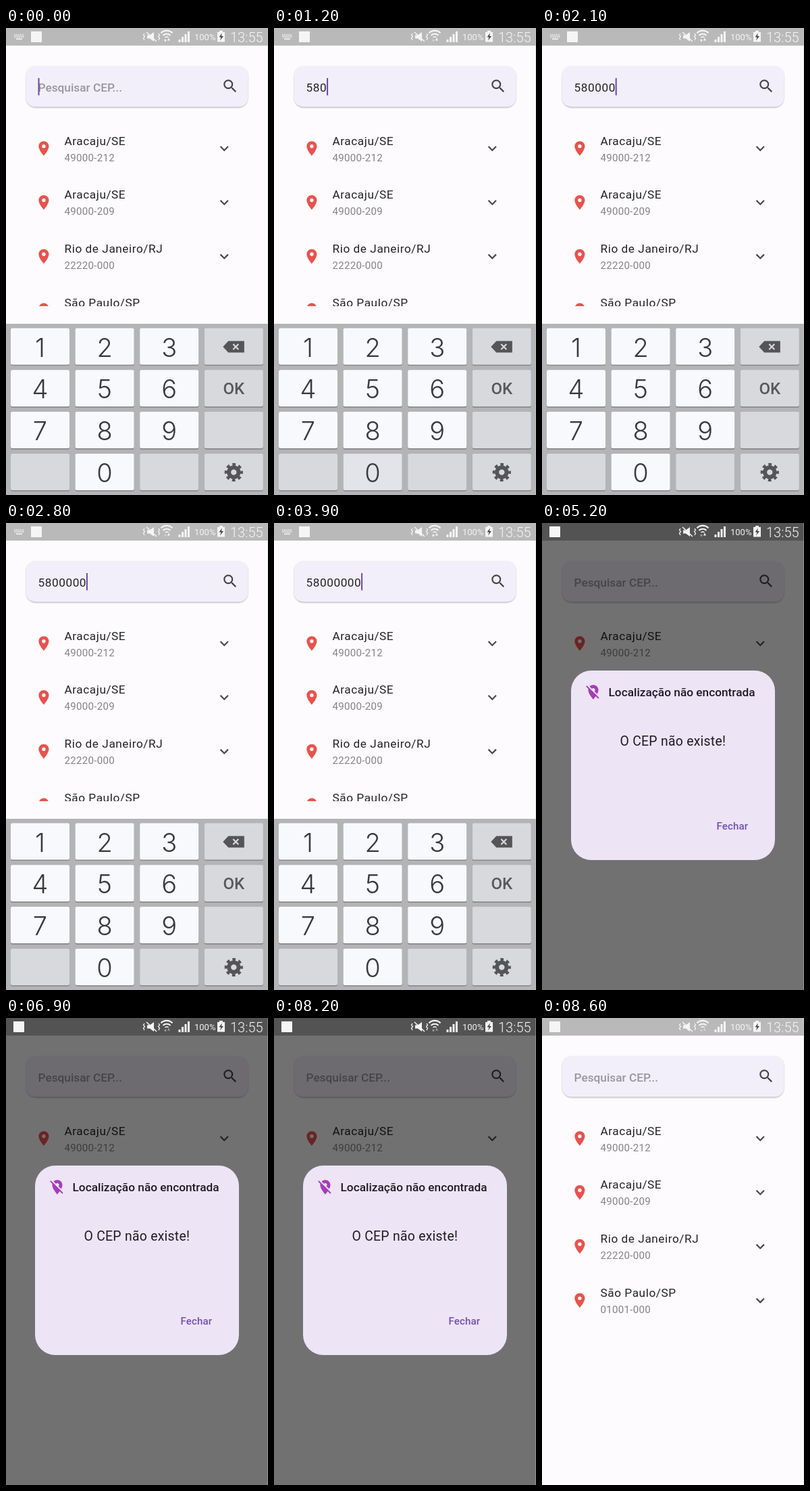
An HTML page that plays this animation: 388 by 690 pixels, repeating every 8.8 s.

```html
<!DOCTYPE html>
<html lang="pt-BR">
<head>
<meta charset="utf-8">
<title>Busca de CEP</title>
<style>
  html, body { margin: 0; width: 100%; height: 100%; overflow: hidden; background: #fdfbfd; }
  svg { display: block; width: 100vw; height: 100vh; font-family: Roboto, "Noto Sans", sans-serif; }
  .title { font-size: 17.24px; letter-spacing: .54px; fill: #242327; }
  .sub { font-size: 15.1px; letter-spacing: .27px; fill: #858388; }
  .strong { font-size: 17.24px; font-weight: 500; }
  .digit { font: 300 38px Inter, "Open Sans", sans-serif; fill: #3b3b3e; text-anchor: middle; }
</style>
</head>
<body>
<svg viewBox="0 0 388 690">
  <defs>
    <path id="pin" fill="#e8524e" fill-rule="evenodd" d="M12 2C8.13 2 5 5.13 5 9c0 5.25 7 13 7 13s7-7.75 7-13c0-3.87-3.13-7-7-7zm0 9.5a2.5 2.5 0 1 1 0-5 2.5 2.5 0 0 1 0 5z"/>
    <path id="more" fill="#49454b" d="M16.59 8.59 12 13.17 7.41 8.59 6 10l6 6 6-6z"/>
    <clipPath id="listClip"><rect id="listBox" y="120" width="388" height="291"/></clipPath>
    <filter id="soft" x="-10%" y="-20%" width="120%" height="150%"><feGaussianBlur stdDeviation="1.2"/></filter>
  </defs>

  <rect width="388" height="690" fill="#fdfbfd"/>
  <rect id="lower" y="438" width="388" height="252" fill="#fef8ff"/>
  <rect width="388" height="26" fill="#bab9ba"/>

  <rect x="30" y="57.5" width="328" height="60" rx="14" fill="#000" opacity=".32" filter="url(#soft)"/>
  <rect x="29.5" y="56" width="329" height="60.5" rx="14" fill="#f3effa"/>
  <text id="hint" class="strong" x="47.5" y="93.5" fill="#99969f">Pesquisar CEP...</text>
  <text id="typed" class="title" x="47.5" y="94"></text>
  <rect id="cursor" y="74" width="2" height="25.5" fill="#6a45b2"/>
  <path id="lens" transform="translate(319 73) scale(1.078)" fill="#49454f" d="M15.5 14h-.79l-.28-.27A6.47 6.47 0 0 0 16 9.5 6.5 6.5 0 1 0 9.5 16c1.61 0 3.09-.59 4.23-1.57l.27.28v.79l5 4.99L20.49 19zm-6 0a4.5 4.5 0 1 1 0-9 4.5 4.5 0 0 1 0 9z"/>

  <g id="list" clip-path="url(#listClip)"></g>
  <g id="keyboard"><rect y="437" width="388" height="253" fill="#b4b4b6"/></g>

  <g id="dialog">
    <rect width="388" height="690" opacity=".55"/>
    <rect x="43" y="218" width="302" height="280" rx="30" fill="#ede4f6"/>
    <path transform="translate(63 237) scale(1.078)" fill="#a73cb9" d="M12 6.5c1.38 0 2.5 1.12 2.5 2.5 0 .74-.33 1.39-.83 1.85l3.63 3.63c.98-1.86 1.7-3.8 1.7-5.48 0-3.87-3.13-7-7-7-1.98 0-3.76.83-5.04 2.15l3.19 3.19c.46-.52 1.11-.84 1.85-.84zm4.37 9.6-4.74-4.74L3.27 3 2 4.27l3.18 3.18C5.07 7.95 5 8.47 5 9c0 5.25 7 13 7 13s1.67-1.85 3.38-4.35L18.73 21 20 19.73z"/>
    <text class="strong" x="98.5" y="256" fill="#1f1b24">Localização não encontrada</text>
    <text x="115.5" y="329" font-size="19.4" letter-spacing=".27" fill="#1f1b24">O CEP não existe!</text>
    <text x="258.5" y="452.5" font-size="15.1" font-weight="500" letter-spacing=".11" fill="#724fb4">Fechar</text>
  </g>

  <g id="status" fill="#f5f5f5">
    <g id="kbdIcon" stroke="#f0f0f0" stroke-width="1.8" fill="none">
      <path d="M12 10.3h15M12.5 13.2h14" stroke-dasharray="2 1"/><path d="M15 16.2h9"/>
    </g>
    <rect id="mail" y="5" width="16" height="16"/>
    <g fill="none" stroke="#f5f5f5">
      <path d="M205 8l-1.500 2.500 2 2-2 2.500 1.500 3M226 8l1.500 2.500-2 2 2 2.500-1.500 3" stroke-width="1.300"/>
      <path d="M208 6l15 14" stroke-width="1.600"/>
      <path d="M229.500 7.500a12 12 0 0 1 17 0" stroke-width="2.200"/>
      <path d="M232.500 11a8 8 0 0 1 11 0" stroke-width="2"/>
      <path d="M235.500 14a4 4 0 0 1 5 0" stroke-width="1.600"/>
    </g>
    <path d="M209 10.500h4l6-4.500v14l-6-4.500h-4z"/>
    <path id="down" d="M234 17h4l-2 4z"/>
    <path id="up" d="M239 18.500h4l-2-4z"/>
    <path d="M255.500 21v-4h3v4zM260 21v-8h3v8zM264.500 21v-12h3v12zM269 21v-16h3v16z"/>
    <text x="279" y="18" font-size="13">100%</text>
    <path d="M316 4h5v2h3v14.500h-11v-14.500h3z"/>
    <path d="M320 7.500l-4.500 6h3l-1.500 5 5-6.500h-3z" fill="#444"/>
    <text x="332" y="21" font-size="20" font-weight="300">13:55</text>
  </g>
  <rect x="387" width="1" height="690" fill="#a4dc9c" opacity=".4"/>
</svg>

<script>
const LOOP = 8800, CODE = "58000000";
const TYPED = [200, 500, 800, 1300, 1600, 2100, 2500, 3100];
const PRESSES = [["5", 100, 200], ["0", 1200, 1300], ["0", 1500, 1600], ["0", 2400, 2500], ["0", 3000, 3100]];
const PLACES = [["Aracaju/SE", "49000-212"], ["Aracaju/SE", "49000-209"],
                ["Rio de Janeiro/RJ", "22220-000"], ["São Paulo/SP", "01001-000"]];
const KEYS = ["1", "2", "3", "del", "4", "5", "6", "OK", "7", "8", "9", "", "", "0", "", "gear"];
const $ = id => document.getElementById(id);
const show = (id, on) => $(id).setAttribute("visibility", on ? "visible" : "hidden");
const set = (id, name, value) => $(id).setAttribute(name, value);

$("list").innerHTML = PLACES.map(([city, code], i) => `<g transform="translate(0 ${i * 79.8})">
  <use href="#pin" transform="translate(43 165) scale(1.078)"/>
  <text class="title" x="86.5" y="172.500">${city}</text>
  <text class="sub" x="86.5" y="196.500">${code}</text>
  <use href="#more" transform="translate(310.3 165) scale(1.078)"/></g>`).join("");

function keyFace(label, x, y) {
  if (label === "del") return `<path d="M${x - 16} ${y}l8-8.500h23.500v17h-23.500z" fill="#555558"/>
    <path d="M${x - 1} ${y - 4}l8 8m0-8l-8 8" stroke="#d8d9dc" stroke-width="2.200"/>`;
  if (label === "gear") return `<g fill="none" stroke="#555558">
    <circle cx="${x}" cy="${y}" r="7.2" stroke-width="6"/>
    <circle cx="${x}" cy="${y}" r="11.3" stroke-width="4.6" stroke-dasharray="4.6 4.275" stroke-dashoffset="2.3"/></g>`;
  if (label === "OK") return `<text x="${x}" y="${y + 8.5}" font-size="24" font-weight="500" text-anchor="middle" fill="#58585b">OK</text>`;
  return `<text class="digit" x="${x}" y="${y + 14.5}">${label}</text>`;
}

$("keyboard").innerHTML += KEYS.map((label, i) => {
  const x = 7 + i % 4 * 95.6, y = 443.5 + Math.floor(i / 4) * 61.8;
  const box = `x="${x}" width="87" height="54" rx="2.5"`;
  return `<rect ${box} y="${y + 1.6}" fill="#88888b"/>
    <rect ${box} y="${y}" id="key${i}" fill="${/\d/.test(label) ? "#f8f9fc" : "#d8d9dc"}"/>
    ${keyFace(label, x + 43.5, y + 27.5)}`;
}).join("");

function draw(t) {
  const n = TYPED.filter(at => t >= at).length;
  const cleared = t >= 5200, typing = t < 4200;
  $("typed").textContent = cleared ? "" : CODE.slice(0, n);
  show("hint", cleared || n === 0);
  show("cursor", typing && !(t >= 3400 && t < 3800));
  set("cursor", "x", 47.5 + n * 10.2);
  set("lens", "fill", t >= 4900 && !cleared ? "#4d3f50" : "#47434a");

  for (const key of ["5", "0"]) {
    const down = PRESSES.some(([k, from, to]) => k === key && t >= from && t < to);
    set("key" + KEYS.indexOf(key), "fill", down ? "#e2e4e9" : "#f8f9fc");
  }

  // The keyboard leaves in two quick steps.
  const exit = typing ? 0 : Math.min(1, (t - 4100) / 300);
  show("keyboard", exit < 1);
  set("keyboard", "transform", `translate(0 ${253 * exit * exit})`);
  set("keyboard", "opacity", 1 - exit);
  set("listBox", "height", typing ? 291 : 570);
  show("lower", !cleared);
  show("kbdIcon", typing);
  set("mail", "x", typing ? 37 : 11);

  show("dialog", cleared && t < 8600);
  const flips = [800, 1800, 2800, 3800, 4900].filter(at => t >= at).length;
  set("down", "opacity", flips % 2 ? .45 : 1);
  set("up", "opacity", t >= 6900 ? .45 : 1);
}

const start = performance.now();
function tick() {
  const t = (performance.now() - start) % LOOP;
  draw(Math.floor(t / 100) * 100);
  requestAnimationFrame(tick);
}
tick();
</script>
</body>
</html>
```
